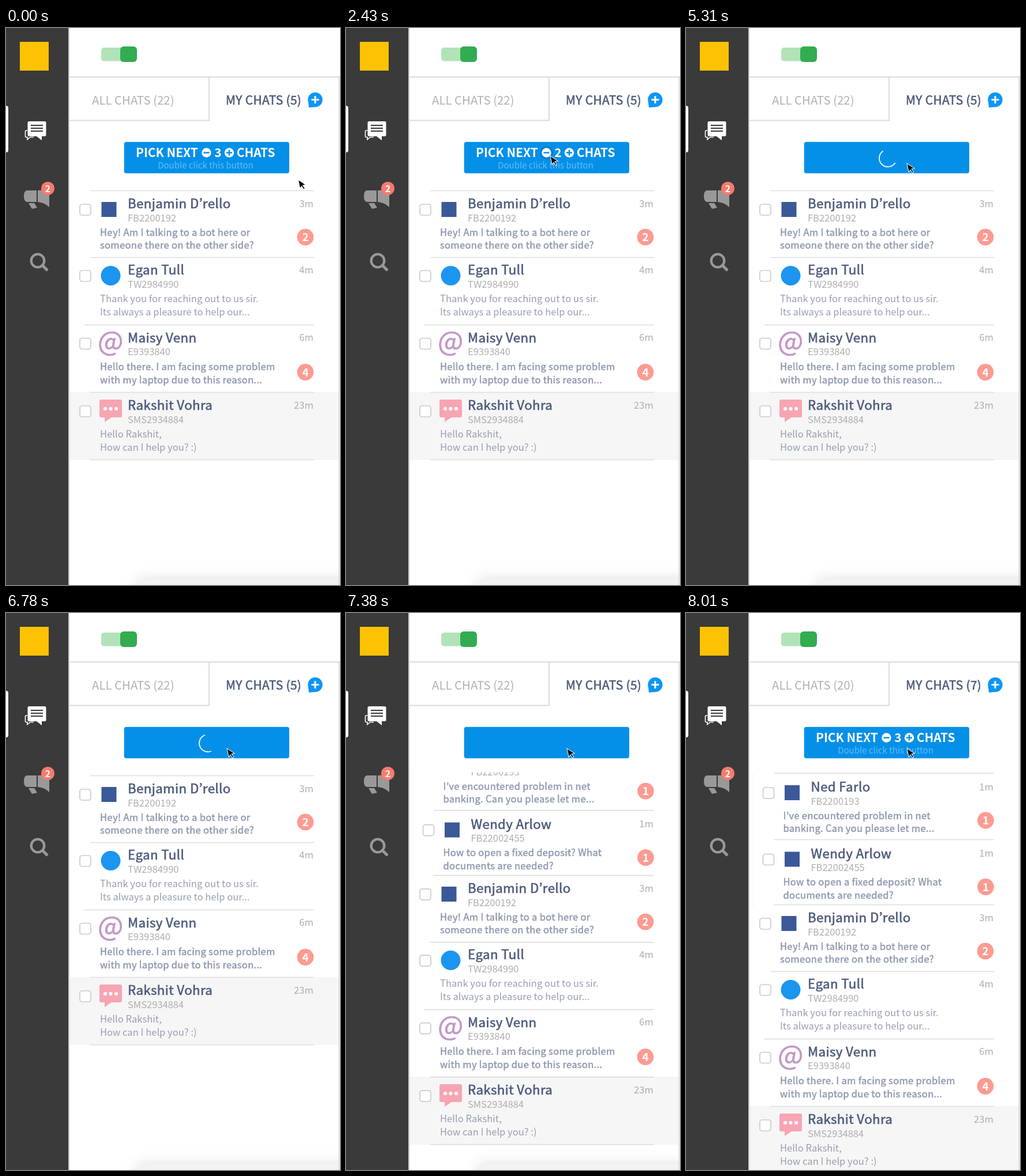
An HTML page that plays this animation: 579 px wide and 967 px high, repeating every 9030 ms.

```html
<!DOCTYPE html>
<html lang="en">
<head>
<meta charset="utf-8">
<title>Chat inbox</title>
<style>
  html, body { margin: 0; width: 100%; height: 100%; overflow: hidden; background: #fff; }
  svg { display: block; width: 579px; height: 967px; }
  text { font-family: "Noto Sans CJK KR", "Noto Sans CJK JP", "Noto Sans CJK SC", "Noto Sans CJK", sans-serif; white-space: pre; }
  .rule { stroke: #dcdcdc; stroke-width: 2; fill: none; }
  .sheet { filter: drop-shadow(0 0 12px rgba(0, 0, 0, .13)); }
</style>
</head>
<body>
<svg viewBox="0 0 579 967">
  <defs><clipPath id="listArea"><rect x="109" y="276.500" width="468" height="700"/></clipPath></defs>

  <rect class="sheet" x="228" y="957" width="420" height="60" rx="8" fill="#f3f3f3"/>
  <g clip-path="url(#listArea)"><g id="list"></g></g>

  <rect width="108.5" height="967" fill="#3a3a3a"/>
  <path class="rule" d="M109.5 0V967M109 85H579M577.5 85V967M352 85V160.500H110"/>

  <!-- sidebar -->
  <rect x="24" y="24" width="50" height="50" fill="#fcc203"/>
  <path d="M0 135q4 0 4 4V212q0 4-4 4Z" fill="#fff"/>
  <path d="M37 178H35q-1.500 0-1.500 1.500V188q0 1.500 1.500 1.500H37V193.500L42 189.500H48" fill="none" stroke="#fff" stroke-width="1.600"/>
  <path d="M40 162H67q2.500 0 2.500 2.500V185.500q0 2.500-2.500 2.500H62V195L53 188H40q-2.500 0-2.500-2.500V164.500q0-2.500 2.500-2.500Z" fill="#fff"/>
  <path d="M43 169H64M43 174H64M43 179H64" stroke="#3a3a3a" stroke-width="2.200"/>
  <g fill="#999">
    <path d="M36 282H53V302H36q-5-1-5-10t5-10ZM55 282Q67 282 75 276V311Q67 303 55 302ZM39 304H49L54 312 45 314Z"/>
    <circle cx="72.500" cy="278.500" r="11.500" fill="#f97a6e"/>
  </g>
  <path d="M64 413L72 421" stroke="#999" stroke-width="5"/>
  <circle cx="55" cy="404" r="11.300" fill="none" stroke="#999" stroke-width="4.300"/>

  <!-- header -->
  <rect x="165" y="34" width="58" height="23.500" rx="5" fill="#b2e3b8"/>
  <rect x="198" y="32" width="29" height="27" rx="6" fill="#32ac51"/>
  <circle cx="536" cy="124.500" r="12.700" fill="#0c96f6"/>
  <path d="M524 128L525 138 537 137Z" fill="#0c96f6"/>
  <path d="M529.500 124.500H542.500M536 118V131" stroke="#fff" stroke-width="3"/>
  <g id="labels"></g>

  <!-- pick button -->
  <rect x="204.700" y="197.700" width="286.300" height="54.600" rx="4" fill="#0590e8"/>
  <rect id="press" x="204.700" y="197.700" width="286.300" height="54.600" rx="4" fill="#003a80"/>
  <g id="caption">
    <circle id="hover" cx="347.500" cy="216.500" r="11.500" fill="#0a7ccb"/>
    <circle cx="347.500" cy="216.500" r="8.200" fill="#fff"/>
    <circle cx="387" cy="216.500" r="8.200" fill="#fff"/>
    <path d="M342.500 216.500H352.500M382 216.500H392M387 211.500V221.500" stroke="#0590e8" stroke-width="2.600"/>
  </g>
  <path id="spinner" fill="none" stroke="#e9f5fe" stroke-width="1.900"/>

  <path id="cursor" d="M0 0V15.500L3.600 12.100 5.900 18.300 8.300 17.300 6 11.200H11Z" fill="#000" stroke="#fff" stroke-width="1"/>
</svg>
<script>
const LOOP = 9030;
const $ = id => document.getElementById(id);

function add(parent, tag, attrs, content = '') {
  const el = document.createElementNS('http://www.w3.org/2000/svg', tag);
  for (const key in attrs) el.setAttribute(key, attrs[key]);
  el.textContent = content;
  parent.append(el);
  return el;
}

// weight: a CSS font weight, or a fraction of an em by which regular strokes are thickened
function write(parent, x, y, content, size, fill, weight = 0, anchor = 'start') {
  const attrs = { x, y, fill, 'font-size': size, 'text-anchor': anchor };
  if (weight >= 1) attrs['font-weight'] = weight;
  else if (weight) Object.assign(attrs, {
    stroke: fill, 'stroke-width': weight * size, 'letter-spacing': weight * .58 * size
  });
  return add(parent, 'text', attrs, content);
}

const SEMI = .028;
const icons = {
  social: (g, y) => add(g, 'rect', { x: 165.5, y: y - 3, width: 26, height: 26, fill: '#3b5998' }),
  feed: (g, y) => add(g, 'circle', { cx: 181.5, cy: y + 10, r: 17, fill: '#1b95f0' }),
  mail: (g, y) => write(g, 181.5, y + 23.5, '@', 47, '#c596c7', .014, 'middle'),
  sms(g, y) {
    add(g, 'path', { d: `M165 ${y - 10}h33q3 0 3 3v25q0 3-3 3h-15l-12 8v-8h-6q-3 0-3-3v-25q0-3 3-3Z`, fill: '#f7a5b3' });
    for (const cx of [172, 181.5, 191]) add(g, 'circle', { cx, cy: y + 6, r: 3.1, fill: '#fff' });
  }
};

// y is the middle of the name line; bottom and lineX place the rule under the row
const rows = [
  { y: 78, dx: 5.5, icon: 'social', name: 'Ned Farlo', id: 'FB2200193', age: '1m', unread: 1,
    lines: ['I’ve encountered problem in net', 'banking. Can you please let me...'], bottom: 169.5, lineX: 152 },
  { y: 193.5, dx: 5.5, icon: 'social', name: 'Wendy Arlow', id: 'FB22002455', age: '1m', unread: 1,
    lines: ['How to open a fixed deposit? What', 'documents are needed?'], bottom: 282.5, lineX: 152 },
  { y: 305, icon: 'social', name: 'Benjamin D’rello', id: 'FB2200192', age: '3m', unread: 2,
    lines: ['Hey! Am I talking to a bot here or', 'someone there on the other side?'], bottom: 398.5, lineX: 146 },
  { y: 420, icon: 'feed', name: 'Egan Tull', id: 'TW2984990', age: '4m',
    lines: ['Thank you for reaching out to us sir.', 'Its always a pleasure to help our...'], bottom: 515.5, lineX: 135 },
  { y: 537.5, icon: 'mail', name: 'Maisy Venn', id: 'E9393840', age: '6m', unread: 4, drop: 1,
    lines: ['Hello there. I am facing some problem', 'with my laptop due to this reason...'], bottom: 632.5, lineX: 146 },
  { y: 655, icon: 'sms', name: 'Rakshit Vohra', id: 'SMS2934884', age: '23m', shade: true,
    lines: ['Hello Rakshit,', 'How can I help you? :)'], bottom: 749.5, lineX: 146 }
];

const list = $('list');
const rule = (x1, y) => add(list, 'path', { d: `M${x1} ${y}H534`, stroke: '#dedede', 'stroke-width': 1.6 });

function drawRow({ y, dx = 0, drop = 0, icon, name, id, age, unread, lines, shade }) {
  if (shade) add(list, 'rect', { x: 110, y: y - 23, width: 467, height: 118, fill: '#f6f6f6' });
  const g = add(list, 'g', { transform: `translate(${dx} 0)` });
  add(g, 'rect', { x: 128, y: y + 1, width: 19, height: 19, rx: 4, fill: '#fff', stroke: '#cbcbcb', 'stroke-width': 1.7 });
  icons[icon](g, y);
  write(g, 211, y + 8, name, 22.3, '#4d5b7c', SEMI);
  write(g, 211, y + 30.5, id, 16.5, '#aeaeae');
  lines.forEach((line, i) => write(g, 163, y + 55.5 + drop + i * (unread ? 22.5 : 23.5), line, 16.6,
    unread ? '#8f98ae' : '#989fb1', unread ? SEMI : 0));
  write(list, 533, y + 5.5, age, 16.7, '#aeaeae', 0, 'end');
  if (unread) {
    const cx = dx ? 519.5 : 519, cy = y + 58 + 2 * drop;
    add(list, 'circle', { cx, cy, r: 14.4, fill: '#fd9b92' });
    write(list, cx, cy + 7, unread, 19, '#fff', 700, 'middle');
  }
}

rows.forEach(drawRow);
const rules = rows.map(r => rule(r.lineX, r.bottom));
rule(152, 54);
const panelEdge = add(list, 'path', { d: 'M116.5 54V288.5', stroke: '#f5f5f5' });

const allTab = write($('labels'), 149, 132.5, '', 20.4, '#b2b2b2');
const myTab = write($('labels'), 381, 132.5, '', 20.9, '#4d5b7c', SEMI);
write($('labels'), 72.5, 284.5, '2', 16, '#fff', 700, 'middle');
write($('caption'), 225, 223.5, 'PICK NEXT', 20.9, '#fff', 700);
write($('caption'), 466.5, 223.5, 'CHATS', 20.9, '#fff', 700, 'end');
write($('caption'), 346, 243.5, 'Double click this button', 15, '#62bcf6', 300, 'middle');
const count = write($('caption'), 367.5, 223.5, '', 20.9, '#fff', 700, 'middle');

const span = (t, from, to) => Math.min(1, Math.max(0, (t - from) / (to - from)));
const ease = u => u < .5 ? (2 * u) ** 2.5 / 2 : 1 - (2 - 2 * u) ** 2.5 / 2;
const mix = (a, b, u) => a + (b - a) * u;

// The arc's head runs round from the top, and its tail follows
function arc(t) {
  const phase = (t - 4540) / 1420 % 1;
  const tail = ease(span(phase, .2, 1)), head = ease(span(phase, 0, .73));
  if (t < 4540 || head - tail < .002) return '';
  const point = f => {
    const a = 2 * Math.PI * Math.min(f, .9999);
    return `${350 + 15 * Math.sin(a)} ${226 - 15 * Math.cos(a)}`;
  };
  return `M${point(tail)}A15 15 0 ${+(head - tail > .5)} 1 ${point(head)}`;
}

function draw(t) {
  const toMinus = ease(span(t, 60, 1020)), toButton = ease(span(t, 2400, 2910));
  const x = mix(mix(506.5, 354, toMinus), 383, toButton);
  const y = mix(mix(263.5, 222, toMinus), 235, toButton);
  $('cursor').setAttribute('transform', `translate(${x} ${y}) rotate(-12)`);

  $('hover').setAttribute('opacity', span(t, 960, 1050) * (1 - span(t, 2460, 2610)));
  $('press').setAttribute('opacity', .15 * Math.sin(Math.PI * span(t, 3330, 3690)));

  const back = span(t, 7830, 8010);
  $('caption').setAttribute('opacity', 1 - span(t, 4110, 4440) + back);
  $('spinner').setAttribute('opacity', 1 - back);
  $('spinner').setAttribute('d', arc(t));

  const picked = t >= 7860;
  count.textContent = t < 1560 || picked ? 3 : 2;
  allTab.textContent = `ALL CHATS (${picked ? 20 : 22})`;
  myTab.textContent = `MY CHATS (${picked ? 7 : 5})`;

  const shift = 224 * ease(span(t, 6930, 7640));
  list.setAttribute('transform', `translate(0 ${shift})`);
  rules[1].setAttribute('d', `M${shift ? 152 : 146} 282.5H534`);
  panelEdge.setAttribute('opacity', shift ? 1 : 0);
}

const start = performance.now();
function tick() {
  draw((performance.now() - start) % LOOP);
  requestAnimationFrame(tick);
}
tick();
</script>
</body>
</html>
```
